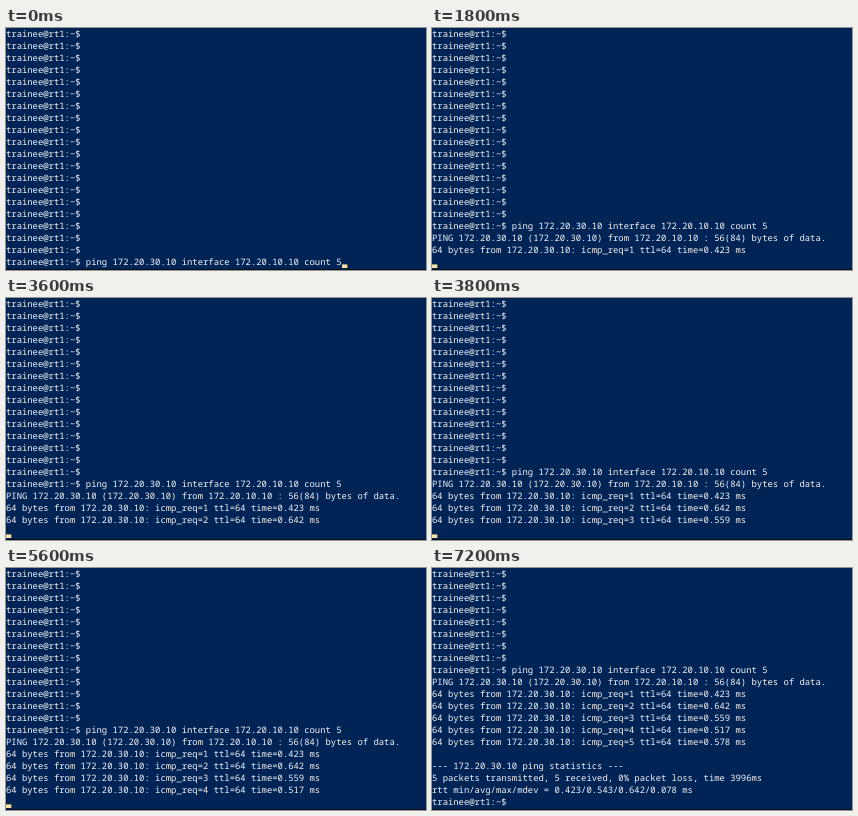
These frames come from a looping animation (420x242 px, 7400 ms). An HTML page:

```html
<!DOCTYPE html>
<html lang="en">
<head>
<meta charset="utf-8">
<title>Ping in a terminal</title>
<style>
  html, body { margin: 0; width: 100%; height: 100%; overflow: hidden; background: #012456; }
  #stage { position: relative; width: 420px; height: 242px; overflow: hidden; background: #012456; }
  #screen {
    position: absolute; left: 0; top: 0; margin: 0;
    font: 500 8.889px/12px "Noto Sans Mono", "DejaVu Sans Mono", monospace;
    text-rendering: geometricPrecision;
    font-variant-ligatures: none;
    color: #f6f5f7;
  }
  #cursor { position: absolute; top: 236px; width: 6px; height: 4px; fill: #f5e3ab; }
  #edge { position: absolute; left: 0; top: 241px; width: 420px; height: 1px; background: #080d1c; }
</style>
</head>
<body>
<div id="stage">
  <pre id="screen"></pre>
  <svg id="cursor"><rect y="0.4" width="5.33" height="3.6"/></svg>
  <div id="edge"></div>
</div>
<script>
const LOOP = 7400, TICK = 200, ROWS = 20, CHAR = 16 / 3;
const PROMPT = 'trainee@rt1:~$';
const COMMAND = PROMPT + ' ping 172.20.30.10 interface 172.20.10.10 count 5';

const reply = (n, ms) => `64 bytes from 172.20.30.10: icmp_req=${n} ttl=64 time=${ms} ms`;

// [time, text printed at that time]
const output = [
  [0, COMMAND],
  [1200, '\n'],
  [1600, 'PING 172.20.30.10 (172.20.30.10) from 172.20.10.10 : 56(84) bytes of data.\n' + reply(1, '0.423') + '\n'],
  [2600, reply(2, '0.642') + '\n'],
  [3800, reply(3, '0.559') + '\n'],
  [4800, reply(4, '0.517') + '\n'],
  [5800, reply(5, '0.578') + '\n\n' +
    '--- 172.20.30.10 ping statistics ---\n' +
    '5 packets transmitted, 5 received, 0% packet loss, time 3996ms\n' +
    'rtt min/avg/max/mdev = 0.423/0.543/0.642/0.078 ms\n' + PROMPT + ' ']
];

const screen = document.getElementById('screen');
const cursor = document.getElementById('cursor');
const history = (PROMPT + '\n').repeat(ROWS);
let shown = '';

function cursorOn(t) {
  const justTyped = t < 200 || (t >= 1200 && t < 1400);
  return justTyped || (t + 1865) % 1060 < 530;
}

function draw(t) {
  const printed = output.filter(([at]) => at <= t).map(([, text]) => text).join('');
  const lines = (history + printed).split('\n').slice(-ROWS);
  const text = lines.join('\n');
  if (text !== shown) screen.textContent = shown = text;
  cursor.style.left = lines[ROWS - 1].length * CHAR + 'px';
  cursor.style.visibility = cursorOn(t) ? 'visible' : 'hidden';
}

const start = performance.now();
function loop() {
  const t = (performance.now() - start) % LOOP;
  draw(Math.floor(t / TICK) * TICK);
  requestAnimationFrame(loop);
}
draw(0);
requestAnimationFrame(loop);
</script>
</body>
</html>
```
